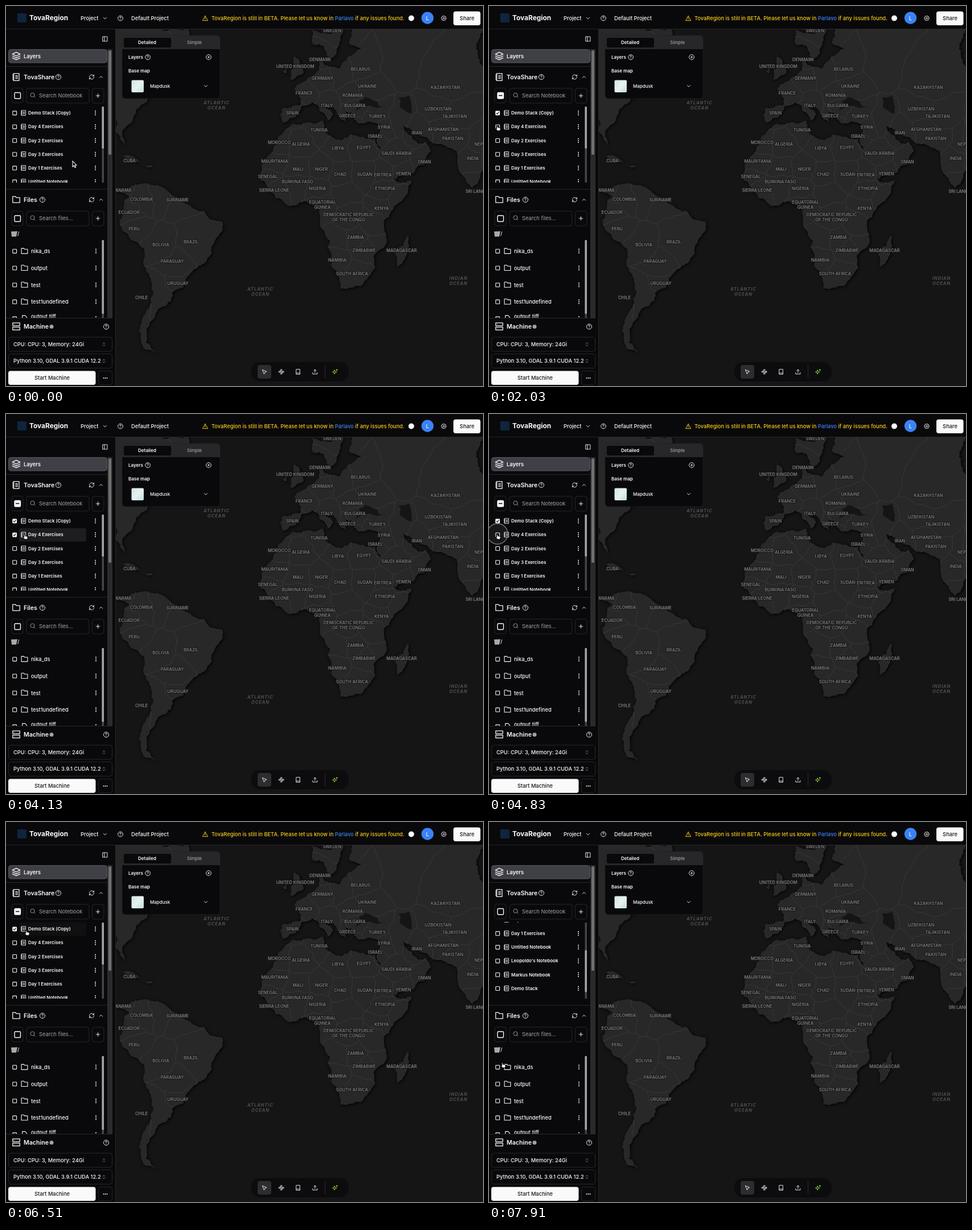
These frames come from a looping animation (838 px wide and 669 px high, 8000 ms). An HTML page with a canvas:

```html
<!DOCTYPE html>
<html lang="en">
<head>
<meta charset="utf-8">
<title>Notebook selection</title>
<style>
html, body { margin: 0; width: 100%; height: 100%; overflow: hidden; background: #09090b; }
canvas { display: block; }
</style>
</head>
<body>
<canvas id="stage" width="838" height="669"></canvas>
<script>
const W = 838, H = 669, LOOP = 8000, STEP = 70;
const WHITE = '#fafafa', MUTED = '#a1a1aa', LINE = '#27272a', BG = '#09090b', INK = '#18181b';
const screen = document.getElementById('stage').getContext('2d');
const base = document.createElement('canvas');
base.width = W; base.height = H;
let ctx = base.getContext('2d');

function text(s, x, y, size = 9.3, weight = 500, color = WHITE, align = 'left') {
  ctx.font = `${weight} ${size}px Inter, sans-serif`;
  ctx.fillStyle = color;
  ctx.textAlign = align;
  ctx.fillText(s, x, y + size * 0.364);
  return x + ctx.measureText(s).width;
}
function box(x, y, w, h, r, fill, stroke, lw = 1) {
  ctx.beginPath();
  ctx.roundRect(x, y, w, h, r);
  if (fill) { ctx.fillStyle = fill; ctx.fill(); }
  if (stroke) { ctx.strokeStyle = stroke; ctx.lineWidth = lw; ctx.stroke(); }
}
function disc(x, y, r, fill) {
  ctx.beginPath();
  ctx.arc(x, y, r, 0, 7);
  ctx.fillStyle = fill;
  ctx.fill();
}
function dots(x, y, dx, dy) {
  for (let i = -1; i < 2; i++) disc(x + i * dx, y + i * dy, 1, WHITE);
}
function clipped(x, y, w, h, draw) {
  ctx.save();
  ctx.beginPath();
  ctx.rect(x, y, w, h);
  ctx.clip();
  draw();
  ctx.restore();
}

// Icons live on a 24-unit grid.
const ring = (p, x, y, r) => { p.moveTo(x + r, y); p.arc(x, y, r, 0, 7); };
const poly = (p, ...v) => { for (let i = 0; i < v.length; i += 2) p[i ? 'lineTo' : 'moveTo'](v[i], v[i + 1]); };
const icons = {
  help(p) { ring(p, 12, 12, 10); p.moveTo(9, 9); p.arc(12, 9, 3, 3.2, 7.6); p.lineTo(12, 13); poly(p, 12, 17, 12, 17.1); },
  add(p) { ring(p, 12, 12, 10); poly(p, 8, 12, 16, 12); poly(p, 12, 8, 12, 16); },
  plus(p) { poly(p, 5, 12, 19, 12); poly(p, 12, 5, 12, 19); },
  down(p) { poly(p, 6, 9, 12, 15, 18, 9); },
  up(p) { poly(p, 6, 15, 12, 9, 18, 15); },
  both(p) { poly(p, 7, 15, 12, 20, 17, 15); poly(p, 7, 9, 12, 4, 17, 9); },
  refresh(p) {
    p.arc(12, 12, 9, 3.1, 5.8); poly(p, 21, 3, 21, 8, 16, 8);
    p.moveTo(21, 12); p.arc(12, 12, 9, 0, 2.7); poly(p, 3, 21, 3, 16, 8, 16);
  },
  layers(p) {
    poly(p, 12, 2, 2, 7, 12, 12, 22, 7, 12, 2);
    for (const y of [12, 17]) poly(p, 2, y, 12, y + 5, 22, y);
  },
  folder(p) { poly(p, 2, 3, 10, 3, 12, 6, 22, 6, 22, 20, 2, 20, 2, 3); },
  notebook(p) {
    p.rect(4, 2, 16, 20);
    for (let y = 6; y < 20; y += 4) { poly(p, 2, y, 6, y); if (y < 18) poly(p, 10, y + 2, 16, y + 2); }
  },
  server(p) { for (const y of [2, 14]) { p.rect(2, y, 20, 8); poly(p, 6, y + 4, 6.1, y + 4); } },
  search(p) { ring(p, 11, 11, 8); poly(p, 17, 17, 21, 21); },
  warn(p) { poly(p, 12, 3, 2, 21, 22, 21, 12, 3); poly(p, 12, 9, 12, 14); poly(p, 12, 17, 12, 17.1); },
  panel(p) { p.rect(3, 3, 18, 18); poly(p, 9, 3, 9, 21); },
  file(p) { poly(p, 14, 2, 5, 2, 5, 22, 19, 22, 19, 7, 14, 2); },
  gear(p) {
    ring(p, 12, 12, 3);
    for (let i = 0; i <= 32; i++) {
      const r = i % 4 < 2 ? 10 : 7.5, a = i * Math.PI / 16;
      p[i ? 'lineTo' : 'moveTo'](12 + r * Math.cos(a), 12 + r * Math.sin(a));
    }
  },
  pointer(p) { poly(p, 4, 4, 11, 21, 13.5, 13.5, 21, 11, 4, 4); },
  nodes(p) {
    for (const d of [-7, 7]) { ring(p, 12 + d, 12, 3); ring(p, 12, 12 + d, 3); }
    poly(p, 7, 10, 10, 7); poly(p, 8, 12, 16, 12); poly(p, 14, 17, 17, 14);
  },
  tablet(p) { p.rect(5, 2, 14, 20); poly(p, 5, 17, 19, 17); },
  upload(p) { poly(p, 12, 16, 12, 3); poly(p, 7, 8, 12, 3, 17, 8); poly(p, 3, 15, 3, 21, 21, 21, 21, 15); },
  spark(p) {
    for (let i = 0; i <= 8; i++) {
      const r = i % 2 ? 3 : 8, a = i * Math.PI / 4;
      p[i ? 'lineTo' : 'moveTo'](10 + r * Math.cos(a), 13 + r * Math.sin(a));
    }
    poly(p, 19, 2, 19, 8); poly(p, 16, 5, 22, 5);
  }
};
function icon(name, x, y, size = 10.6, color = WHITE) {
  const p = new Path2D();
  icons[name](p);
  ctx.save();
  ctx.translate(x - size / 2, y - size / 2);
  ctx.scale(size / 24, size / 24);
  ctx.lineWidth = 2;
  ctx.lineCap = ctx.lineJoin = 'round';
  ctx.strokeStyle = color;
  ctx.stroke(p);
  ctx.restore();
}

// Coarse outlines; finer coast detail comes from midpoint displacement.
const southAmerica = [193,320,213,323,232,314,281,323,303,337,326,354,380,379,381,393,367,413,362,436,329,464,312,494,292,504,290,520,268,533,262,545,252,562,246,592,262,611,242,603,234,570,246,466,244,441,200,386,216,336,193,325];
const africa = [505,207,558,203,563,224,588,236,604,226,648,234,664,277,686,310,713,307,697,341,664,378,669,414,646,440,649,460,630,484,608,496,588,497,571,449,565,424,569,413,552,376,553,356,541,351,523,344,495,352,475,339,447,307,449,280,476,240,478,231,495,215];
const europe = [606,188,596,186,598,206,588,200,578,182,553,165,575,190,565,202,546,174,538,170,520,176,508,196,488,206,482,192,485,180,516,175,518,163,506,146,526,132,550,113,553,88,560,104,585,110,602,88,626,73,602,64,608,41];
const asia = [838,41,838,288,819,320,808,308,792,256,745,238,728,229,697,208,700,220,724,242,738,239,747,255,734,280,684,305,651,238,657,210,618,206,610,197];
const northAmerica = [193,41,320,41,330,100,262,158,228,184,220,206,206,218,209,245,198,226,193,222];
const scandinavia = [537,41,540,68,559,72,570,95,586,68,592,41];
const britain = [505,82,512,92,523,118,500,130,506,106];
const ireland = [495,100,493,118,483,116];
const madagascar = [706,404,706,428,688,459,684,438];
const cuba = [199,264,220,264,237,276];
const hispaniola = [239,280,256,280,262,287];
const blackSea = [614,184,630,160,646,166,668,180];
const caspian = [690,162,709,158,712,190,694,180];

const europeNames = [['SWEDEN',573,43],['DENMARK',552,94],['UNITED KINGDOM',508,106],['BELARUS',623,111],['GERMANY',556,127],['UKRAINE',635,141],['FRANCE',524,153],['ROMANIA',609,157],['ITALY',564,175],['BULGARIA',613,175],['SPAIN',503,188],['GREECE',600,193],['',587,122]];
const asiaNames = [['TURKEY',652,194],['KAZAKHSTAN',772,143],['UZBEKISTAN',759,181],['TAJIKISTAN',788,194],['SYRIA',664,213],['AFGHANISTAN',768,217],['ISRAEL',649,229],['IRAN',722,223],['PAKISTAN',785,233],['NEPAL',835,243],['SAUDI ARABIA',686,259],['OMAN',735,274],['INDIA',820,268],['YEMEN',698,295],['SRI LANKA',827,326],['',690,205],['',690,100]];
const africaNames = [['TUNISIA',550,218],['MOROCCO',480,240],['ALGERIA',518,243],['LIBYA',583,250],['EGYPT',629,249],['MAURITANIA',472,273],['MALI',513,287],['NIGER',554,287],['CHAD',587,296],['SUDAN',630,296],['ERITREA',662,297],['SENEGAL',460,300],['BURKINA FASO',512,309],['SIERRA LEONE',471,324],['NIGERIA',547,321],['ETHIOPIA',666,321]];
const southernNames = [['EQUATORIAL|GUINEA',556,350],['KENYA',660,356],['DEMOCRATIC REPUBLIC|OF THE CONGO',602,372],['ZAMBIA',614,407],['ZIMBABWE',629,430],['MADAGASCAR',695,430],['NAMIBIA',582,447],['SOUTH AFRICA',608,471],['',582,412],['',643,382],['',654,418],['',690,338],['',593,331]];
const americaNames = [['CUBA',217,272],['PANAMA',204,324],['COLOMBIA',238,340],['SURINAME',301,341],['ECUADOR',216,363],['PERU',225,392],['BOLIVIA',272,420],['BRAZIL',325,415],['PARAGUAY',292,449],['URUGUAY',302,488],['CHILE',238,513],['',266,335],['',266,500]];
const oceans = [['ATLANTIC|OCEAN',370,174.5],['ATLANTIC|OCEAN',447,502.5],['INDIAN|OCEAN',795,483.5]];
const countries = [europeNames, asiaNames, africaNames, southernNames, americaNames].flat();

const pairs = v => v.filter((_, i) => i % 2 === 0).map((x, i) => [x, v[2 * i + 1]]);
// Position-based noise, so both sides of a shared border get the same bends.
const noise = (x, y) => {
  const n = Math.sin(Math.round(x * 10) * 12.9898 + Math.round(y * 10) * 78.233) * 43758.5453;
  return n - Math.floor(n) - 0.5;
};
function bend(p, a, b, amount) {
  const size = Math.hypot(b[0] - a[0], b[1] - a[1]);
  if (size < 4) return p.lineTo(...b);
  const x = (a[0] + b[0]) / 2, y = (a[1] + b[1]) / 2;
  const mid = [x + noise(x, y) * size * amount, y + noise(y, x) * size * amount];
  bend(p, a, mid, amount);
  bend(p, mid, b, amount);
}
function outline(points, amount) {
  const p = new Path2D();
  p.moveTo(...points[0]);
  points.forEach((a, i) => bend(p, a, points[(i + 1) % points.length], amount));
  p.closePath();
  return p;
}
// Voronoi cell: keep the part of the map nearer to this site than to any other.
function cell([, sx, sy]) {
  let shape = [[0, 0], [W, 0], [W, H], [0, H]];
  for (const [, x, y] of countries) {
    if (x === sx && y === sy) continue;
    const side = ([px, py]) => (px - (x + sx) / 2) * (x - sx) + (py - (y + sy) / 2) * (y - sy);
    shape = shape.flatMap((a, i) => {
      const b = shape[(i + 1) % shape.length], da = side(a), db = side(b), kept = da <= 0 ? [a] : [];
      if (da * db < 0) {
        const k = da / (da - db);
        kept.push([a[0] + (b[0] - a[0]) * k, a[1] + (b[1] - a[1]) * k]);
      }
      return kept;
    });
  }
  return shape;
}
function label([s, x, y], font, color) {
  ctx.font = font + ' 7.5px Inter, sans-serif';
  ctx.textAlign = 'center';
  ctx.lineWidth = 2;
  ctx.lineJoin = 'round';
  ctx.strokeStyle = '#171717';
  ctx.fillStyle = color;
  const rows = s.split('|');
  rows.forEach((row, i) => {
    const top = y + 2.7 + (i - (rows.length - 1) / 2) * 9;
    ctx.strokeText(row, x, top);
    ctx.fillText(row, x, top);
  });
}
function drawMap() {
  const land = new Path2D(), sea = new Path2D();
  for (const v of [southAmerica, africa, europe.concat(asia), northAmerica, scandinavia, britain, ireland, madagascar, cuba, hispaniola])
    land.addPath(outline(pairs(v), 0.32));
  for (const v of [blackSea, caspian]) sea.addPath(outline(pairs(v), 0.32));
  ctx.fillStyle = '#151515';
  ctx.fillRect(193, 41, W, H);
  ctx.shadowColor = '#000';
  ctx.shadowBlur = 5;
  ctx.shadowOffsetX = ctx.shadowOffsetY = 1;
  ctx.fillStyle = '#282828';
  ctx.fill(land);
  ctx.shadowColor = 'transparent';
  ctx.save();
  ctx.clip(land);
  ctx.strokeStyle = '#393939';
  ctx.lineWidth = 0.7;
  for (const site of countries) ctx.stroke(outline(cell(site), 0.25));
  ctx.restore();
  ctx.fillStyle = '#151515';
  ctx.fill(sea);
  for (const place of countries) label(place, '500', '#8a8a8a');
  ctx.letterSpacing = '1px';
  for (const ocean of oceans) label(ocean, 'italic 600', '#555');
  ctx.letterSpacing = '0px';
}

function drawMapControls() {
  box(204, 52, 172, 111, 6, BG, '#1c1c1f');
  box(204, 52, 172, 24, [6, 6, 0, 0], LINE);
  box(207, 56, 83, 17, 3, BG);
  text('Detailed', 248, 64, 8, 600, WHITE, 'center');
  text('Simple', 331, 64, 8, 500, MUTED, 'center');
  text('Layers', 215, 90, 8, 600);
  icon('help', 249, 90);
  icon('add', 356, 90);
  text('Base map', 215, 114, 8, 600);
  const tint = ctx.createLinearGradient(221, 131, 242, 152);
  ['#cfe7e6', '#e8f1ef', '#bfdedf'].forEach((c, i) => tint.addColorStop(i / 2, c));
  box(220.5, 130.5, 21.5, 21.5, 2, tint);
  text('Mapdusk', 253, 141, 8);
  icon('down', 351, 141);
  box(431, 627, 171, 34, 15, '#0c0c0e');
  box(442, 632, 24, 24, 4, '#2d2d2f');
  ['pointer', 'nodes', 'tablet', 'upload'].forEach((name, i) => icon(name, 454 + i * 29.6, 644));
  box(560, 632, 1, 23, 0, '#2d2d2f');
  icon('spark', 578, 644, 11, '#a3e635');
}
function drawHeader() {
  const y = 21.5, yellow = '#facc15', blue = '#3b82f6';
  box(0, 0, W, 40, 0, BG);
  box(0, 40, W, 1, 0, LINE);
  box(20, 13, 16, 16, 0, '#10243f');
  text('TovaRegion', 41, 21, 11.9, 700);
  text('Project', 131, y);
  icon('down', 174, y);
  icon('help', 201, y);
  text('Default Project', 220, y);
  icon('warn', 350, y, 11, yellow);
  let x = text('TovaRegion is still in BETA. Please let us know in ', 361, y, 9.3, 500, yellow);
  x = text('Parlavo', x, y, 9.3, 500, blue);
  text(' if any issues found.', x, y, 9.3, 500, yellow);
  disc(712, y, 5, WHITE);
  disc(740.5, 21, 10.7, blue);
  text('L', 740.5, y, 9.3, 500, WHITE, 'center');
  icon('gear', 769, y);
  box(786, 9.5, 47.5, 24.5, 4, WHITE);
  text('Share', 810, y, 9.3, 500, INK, 'center');
}

function section(name, glyph, helpX, y, hint) {
  icon(glyph, 18, y, 15);
  text(name, 31, y, 10.6, 600);
  icon('help', helpX, y, 11);
  icon('refresh', 150.5, y);
  icon('up', 167, y);
  box(36, y + 20, 110, 26, 4, null, LINE);
  icon('search', 47, y + 32, 10.6, MUTED);
  text(hint, 58, y + 33, 9.3, 400, MUTED);
  box(151.5, y + 20, 20.5, 26, 4, null, LINE);
  icon('plus', 161.5, y + 33, 11);
}
function selectBox(s, y) {
  box(4.5, y - 12.5, 182, 25, 4, null, LINE);
  clipped(0, y - 12, 167, 24, () => text(s, 13, y));
  icon('both', 172, y, 9, MUTED);
}
function masterBox(y, mixed) {
  box(10, y - 13, 20, 26, 4, BG, LINE);
  box(15, y - 5, 10.5, 10.5, 1.5, mixed ? WHITE : null, WHITE, 1.4);
  if (mixed) box(17, y - 0.7, 6.5, 1.6, 0, INK);
}
function smallBox(y, on) {
  box(11.8, y - 3.2, 6.8, 6.8, 0.8, on ? WHITE : null, WHITE, 1.1);
  if (!on) return;
  const tick = new Path2D();
  poly(tick, 13, y + 0.2, 14.6, y + 1.8, 17.4, y - 1.6);
  ctx.strokeStyle = INK;
  ctx.lineWidth = 1.2;
  ctx.stroke(tick);
}
function scrollbar(top, height, thumbTop, thumb) {
  box(168.5, top, 3.5, height, 0, '#454546');
  box(168.5, thumbTop, 3.5, thumb, 1.5, '#a3a3a3');
}
function drawSidebar() {
  box(0, 41, 192, H, 0, BG);
  box(192, 41, 1, H, 0, LINE);
  for (const y of [106, 322]) box(0, y, 178, 1, 0, LINE);
  icon('panel', 174, 58);
  box(4.5, 76.5, 173, 23.5, 4, '#3f3f46', '#57575e');
  icon('layers', 18, 88, 16);
  text('Layers', 31, 88.5, 9.3, 600);
  box(178, 76, 9, 473, 0, '#2b2b2c');
  box(180, 78, 5, 184, 2.5, '#707071');
  section('TovaShare', 'notebook', 92, 125, 'Search Notebook');
  section('Files', 'folder', 64, 341, 'Search files...');
  masterBox(374, false);
  const flap = new Path2D();
  poly(flap, 9, 397, 20, 396.5, 18, 406, 10, 406);
  ctx.fillStyle = '#a9a9a9';
  ctx.fill(flap);
  text('/', 20, 401);
  clipped(0, 410, 178, 139.5, () => {
    ['nika_ds', 'output', 'test', 'test1undefined', 'output.tiff'].forEach((name, i) => {
      const y = 431.5 + i * 29.7, last = i === 4;
      smallBox(y, false);
      icon(last ? 'file' : 'folder', 32.5, y, 13);
      text(name, 44, last ? 546.5 : y + 0.5);
      dots(158, y, 0, 3.2);
    });
    scrollbar(412, 138, 412, 130);
  });
  box(0, 549, 187, 1, 0, LINE);
  icon('server', 18, 564, 15);
  text('Machine', 31, 564.5, 10.6, 600);
  disc(80, 564.5, 3.5, MUTED);
  icon('help', 176, 564.5, 11);
  selectBox('CPU: CPU: 3, Memory: 24Gi', 595.5);
  selectBox('Python 3.10, GDAL 3.9.1 CUDA 12.2', 625);
  box(4, 642.5, 153.5, 24.5, 4, WHITE);
  text('Start Machine', 81, 655, 9.3, 500, INK, 'center');
  box(162.5, 642.5, 24, 24.5, 4, null, LINE);
  dots(174.5, 655, 3, 0);
}

const notebooks = ['Demo Stack (Copy)', 'Day 4 Exercises', 'Day 2 Exercises', 'Day 3 Exercises', 'Day 1 Exercises',
  'Untitled Notebook', "Leopoldo's Notebook", 'Markus Notebook', 'Demo Stack'];
// Each move: start, end, x, y.
const moves = [[70,840,15,203],[1050,1300,15,192],[1680,1820,14,210],[2240,2560,184,213],[2680,2870,159,215],
  [3920,4130,32,211],[4200,4480,14,211],[4970,5320,173,178],[5460,5670,160,186],[6300,6510,35,190],
  [6510,6720,14,190],[7210,7560,17,196],[7560,7910,23,423]];
const clicks = [1330, 2100, 3080, 4550, 5740, 6800];
const menus = [{ from: 3290, to: 3990, y: 212, items: ['Copy', 'Delete'] },
  { from: 5940, to: 6370, y: 188, items: ['Open', 'Rename', 'Copy', 'Delete'] }];
const clamp = v => Math.max(0, Math.min(1, v));
const ease = v => v * v * (3 - 2 * v);
const within = (v, a, b) => v >= a && v < b;

function cursorAt(t) {
  let x = 117, y = 273;
  for (const [from, to, tx, ty] of moves) {
    const k = ease(clamp((t - from) / (to - from)));
    x += (tx - x) * k;
    y += (ty - y) * k;
  }
  return [x, y];
}
function drawList(t, [cx, cy], menuOpen) {
  const checked = [within(t, 1470, 6930), within(t, 2240, 4690)];
  const scroll = 89 * ease(clamp((t - 7180) / 380));
  masterBox(157.5, checked[0] || checked[1]);
  clipped(0, 176, 178, 135, () => {
    notebooks.forEach((name, i) => {
      const y = 188.3 + i * 24.2 - scroll;
      const hover = !menuOpen && within(cy, 176, 311) && within(cx, 23, 141) && Math.abs(cy - y) < 11.5;
      if (hover) box(23, y - 11.5, 118, 23.5, 3, i ? '#1d1d20' : '#120f10');
      smallBox(y, checked[i]);
      icon('notebook', 31, y);
      text(name, 39, y, 8, 600);
      dots(157, y, 0, 3.2);
    });
    scrollbar(177, 134, 177 + scroll * 0.545, 74);
  });
}
function drawMenu({ y, items }) {
  const top = y + 14, row = 21.2;
  box(146, top, 85, items.length * row + 12, 4, BG, LINE);
  items.forEach((s, i) => {
    const last = i === items.length - 1;
    text(s, 154, top + 13.5 + i * row + (last ? 6 : 0));
    if (last) box(147, top + 5.5 + i * row, 83, 0.8, 0, LINE);
  });
}
function drawClicks(t) {
  for (const start of clicks) {
    const p = (t - start) / 350;
    if (!within(p, 0, 1)) continue;
    const [x, y] = cursorAt(start);
    ctx.globalAlpha = clamp((1 - p) * 2.5);
    disc(x + 1, y, 9 + 9 * ease(clamp(p * 2.6)), 'rgba(160,160,160,.2)');
    for (const [width, color] of [[3, 'rgba(0,0,0,.6)'], [1.4, '#e5e5e5']]) {
      ctx.lineWidth = width;
      ctx.strokeStyle = color;
      ctx.stroke();
    }
    ctx.globalAlpha = 1;
  }
}
function drawCursor([x, y], arrow) {
  const p = new Path2D(arrow
    ? 'M0 0V10L2.3 8 3.9 11.5 5.6 10.8 4.1 7.2H7Z'
    : 'M-.8 .8Q0-.4 .9 .7L1.6 3.5 4.8 4.2Q6.6 4.6 6.3 6.3L5.4 9.8H.9L-2.2 6.3Q-2.3 4.8-.4 5.7Z');
  ctx.save();
  ctx.translate(x, y);
  ctx.lineWidth = 1.1;
  ctx.fillStyle = arrow ? '#050505' : '#f4f4f4';
  ctx.strokeStyle = arrow ? '#f4f4f4' : '#050505';
  ctx.fill(p);
  ctx.stroke(p);
  ctx.restore();
}

drawMap();
drawMapControls();
drawHeader();
drawSidebar();
ctx = screen;
let begin;
function frame(now) {
  begin ??= now;
  const t = Math.min(7910, Math.floor((now - begin) % LOOP / STEP) * STEP);
  const cursor = cursorAt(t);
  const menu = menus.find(m => within(t, m.from, m.to));
  ctx.drawImage(base, 0, 0);
  drawList(t, cursor, menu);
  if (menu) drawMenu(menu);
  drawClicks(t);
  drawCursor(cursor, t < 910 || cursor[0] > 168);
  requestAnimationFrame(frame);
}
requestAnimationFrame(frame);
</script>
</body>
</html>
```
